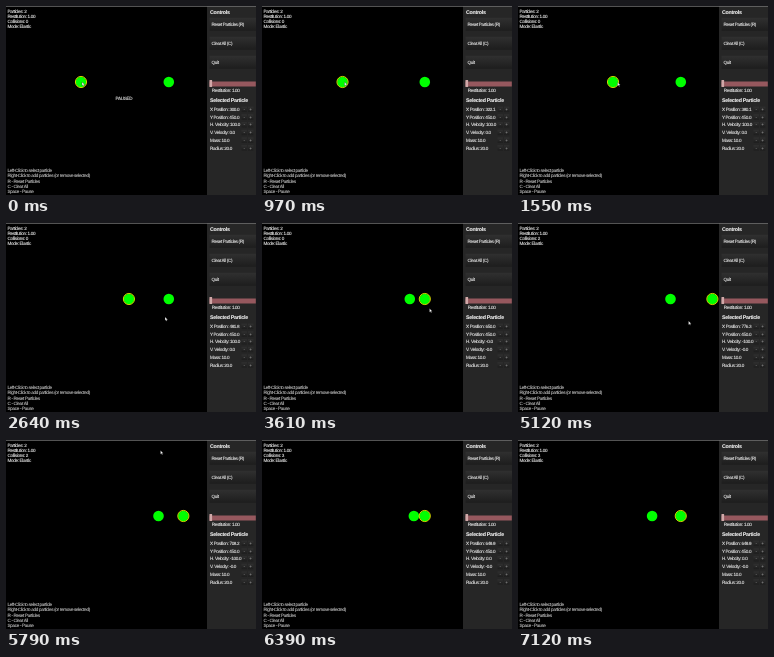
These frames come from a looping animation (250 px wide and 189 px high, 7.15 s). An HTML page:

```html
<!DOCTYPE html>
<html lang="en">
<head>
<meta charset="utf-8">
<title>Particle collisions</title>
<style>
  html, body { margin: 0; width: 100%; height: 100%; overflow: hidden; background: #000; }
  svg { display: block; width: 100%; height: 100%; }
  text {
    font: 4.6px "Liberation Sans", Arial, sans-serif;
    letter-spacing: -.32px;
    fill: #e2e2e2;
    stroke: #e2e2e2;
    stroke-width: .12;
    text-rendering: geometricPrecision;
    white-space: pre;
  }
  .help { fill: #b8b8b8; stroke: #b8b8b8; }
  .head { font-size: 5.3px; font-weight: bold; letter-spacing: -.27px; fill: #f0f0f0; }
  .sign { text-anchor: middle; letter-spacing: 0; fill: #aaa; stroke: none; }
  .button { fill: url(#shade); }
  .ball { fill: #0f0; }
  .ring { fill: none; stroke: #ff0; stroke-width: .8; }
</style>
</head>
<body>
<svg id="stage" viewBox="0 0 250 189" preserveAspectRatio="none">
  <linearGradient id="shade" x2="0" y2="1">
    <stop stop-color="#303030"/>
    <stop offset="1" stop-color="#1d1d1d"/>
  </linearGradient>
</svg>
<script>
const LOOP = 7150, SCALE = 0.25, BALL_Y = 76;
const START = 750, SELECT = 3200, HIT = 3795, WALL = 5085, RETURN = 6365;

// Rows of [time, value, ...]
const leftPath = [[START, 300], [1550, 380], [2640, 491.7], [HIT, 610], [RETURN, 610], [7120, 536.5], [LOOP, 533.5]];
const rightPath = [[HIT, 650], [4450, 716.7], [WALL, 780], [5790, 708.3], [RETURN, 649.9]];
const cursorPath = [
  [90, 76, 76], [120, 76.3, 76], [760, 76.3, 76], [1550, 99.5, 76.3], [2640, 159, 94],
  [3150, 162.5, 77], [3250, 162.5, 77], [3610, 167.5, 85.5], [4450, 170.5, 98],
  [5180, 170.5, 98], [5700, 154.5, 10.5], [5850, 154.5, 10.5], [5880, 154.3, 1], [5940, 154, -8]
];

const stage = document.getElementById("stage");

function add(tag, attrs, content = "") {
  const node = document.createElementNS("http://www.w3.org/2000/svg", tag);
  for (const key in attrs) node.setAttribute(key, attrs[key]);
  node.textContent = content;
  return stage.appendChild(node);
}

// y is the middle of the capitals
const label = (x, y, content, cls = "") => add("text", { x, y: y + 1.6, class: cls }, content);
const box = (x, y, width, height, attrs) => add("rect", { x, y, width, height, ...attrs });

function at(path, t) {
  if (t <= path[0][0]) return path[0].slice(1);
  for (let i = 1; i < path.length; i++) {
    const [a, ...from] = path[i - 1], [b, ...to] = path[i];
    if (t < b) return from.map((v, k) => v + (to[k] - v) * (t - a) / (b - a));
  }
  return path[path.length - 1].slice(1);
}

box(0, 0, 250, 189, { fill: "#000" });

// Status and help
label(1.5, 5, "Particles: 2");
label(1.5, 10.2, "Restitution: 1.00");
const hits = label(1.5, 15.4, "");
label(1.5, 20.6, "Mode: Elastic");
[
  "Left-Click to select particle",
  "Right-Click to add particles (or remove selected)",
  "R - Reset Particles",
  "C - Clear All",
  "Space - Pause"
].forEach((line, i) => label(1.5, 164.7 + i * 5.15, line, "help"));

// Control panel
box(201, 0, 49, 189, { fill: "#262626" });
label(204, 6.2, "Controls", "head");
["Reset Particles (R)", "Clear All (C)", "Quit"].forEach((name, i) => {
  box(203.6, 11.8 + i * 19, 46.4, 13, { class: "button" });
  label(205.5, 18 + i * 19, name);
});
box(203.5, 75.5, 46.3, 5, { fill: "#96585e" });
box(203.5, 74, 2.6, 7, { fill: "#d0a8a8" });
label(205.8, 83.9, "Restitution: 1.00");
label(204, 94.8, "Selected Particle", "head");
const rows = Array.from({ length: 6 }, (_, i) => {
  const y = 103.4 + i * 7.7;
  [[235.5, "-"], [242, "+"]].forEach(([x, sign]) => {
    box(x, y - 2.7, 5.4, 5.4, { class: "button" });
    label(x + 2.7, y, sign, "sign");
  });
  return label(204, y, "");
});
box(0, 0, 250, .7, { fill: "#777" });

// Scene
const left = add("circle", { cy: BALL_Y, r: 5.3, class: "ball" });
const right = add("circle", { cy: BALL_Y, r: 5.3, class: "ball" });
const ring = add("circle", { cy: BALL_Y, r: 5.6, class: "ring" });
const paused = label(109.6, 92.3, "PAUSED");
const cursor = add("path", {
  d: "M0 0V3.7L.9 2.9L1.5 4.2L2.2 3.9L1.6 2.7H2.8Z",
  fill: "#fff", stroke: "#000", "stroke-width": .25
});

function speed(t) {
  if (t < SELECT) return "100.0";
  if (t < HIT) return "-0.0";
  if (t < WALL) return "100.0";
  return t < RETURN ? "-100.0" : "0.0";
}

function draw(t) {
  const [a] = at(leftPath, t), [b] = at(rightPath, t), [mx, my] = at(cursorPath, t);
  const second = t >= SELECT, x = second ? b : a;
  left.setAttribute("cx", a * SCALE);
  right.setAttribute("cx", b * SCALE + .3);
  ring.setAttribute("cx", x * SCALE + (second ? .3 : 0));
  cursor.setAttribute("transform", `translate(${mx} ${my})`);
  paused.style.display = t < START ? "" : "none";
  hits.textContent = "Collisions: " + [HIT, WALL, RETURN].filter(time => t >= time).length;
  [
    "X Position: " + x.toFixed(1),
    "Y Position: 450.0",
    "H. Velocity: " + speed(t),
    "V. Velocity: " + (second ? "-0.0" : "0.0"),
    "Mass: 10.0",
    "Radius: 20.0"
  ].forEach((line, i) => { rows[i].textContent = line; });
}

const begin = performance.now();
function tick() {
  draw((performance.now() - begin) % LOOP);
  requestAnimationFrame(tick);
}
tick();
</script>
</body>
</html>
```
